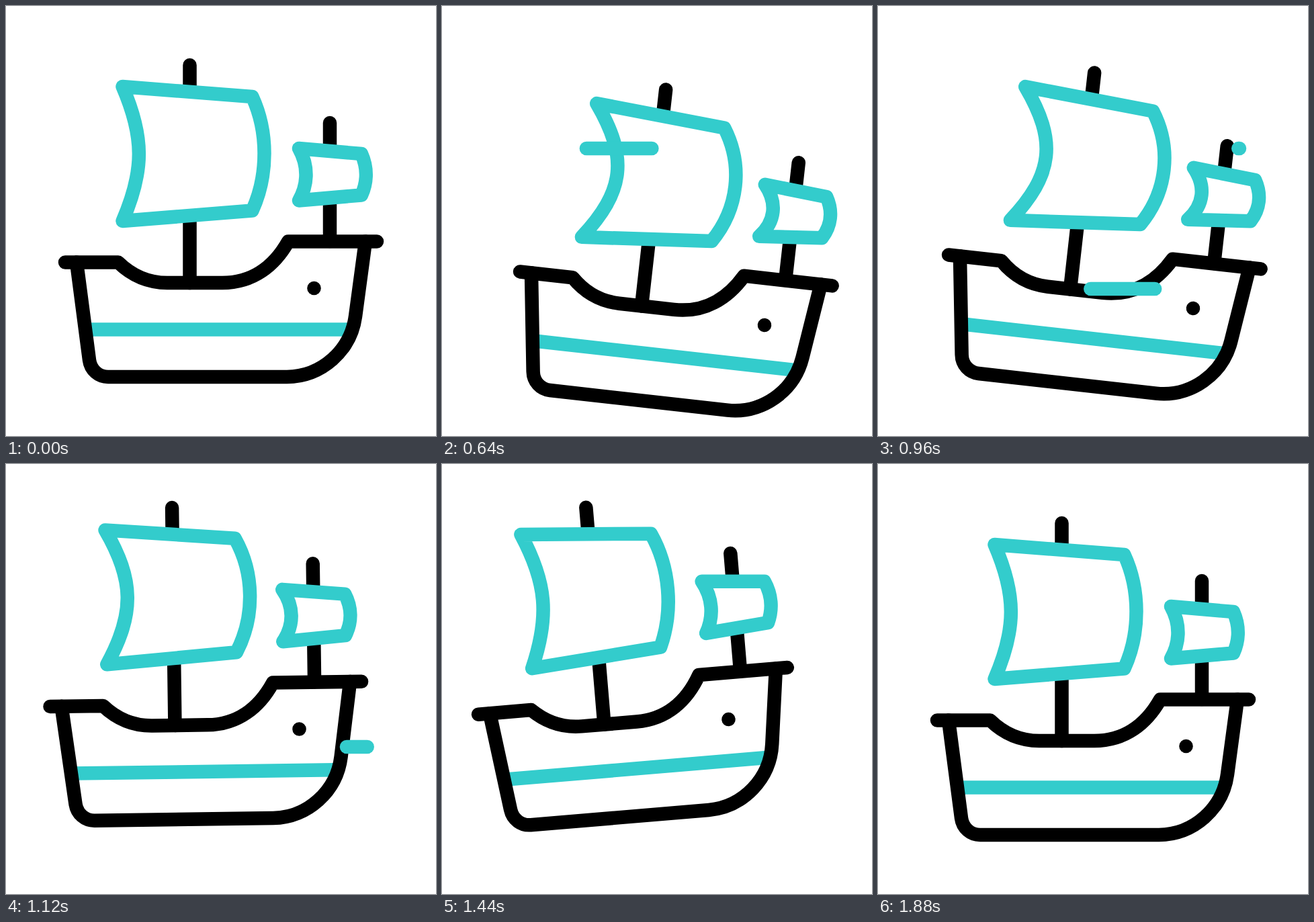
Write an HTML page that moves like this. It is 640 px wide and 640 px high and loops after 2160 ms.

```html
<!DOCTYPE html>
<html lang="en">
<head>
<meta charset="utf-8">
<title>Sailing ship</title>
<style>
  html, body { margin: 0; height: 100%; overflow: hidden; background: #fff; }
  svg { display: block; width: 100vw; height: 100vh; }
  path { fill: none; stroke: #000; stroke-width: 20.5; stroke-linecap: round; stroke-linejoin: round; }
  .teal { stroke: #3cc; }
  .sail { fill: #fff; }
</style>
</head>
<body>
<svg viewBox="0 0 640 640">
  <g id="ship">
    <path d="M273.5 88V412M482 174V350"/>
    <path id="mainSail" class="teal sail"/>
    <path id="smallSail" class="teal sail"/>
    <path class="teal" d="M121 481.5H510"/>
    <path d="M105 381.5L124 527C126 542 138 552 152 552H418A104 104 0 0 0 520 462L535 350.5"/>
    <path d="M88 381.5H167C187 401 212 412 240 412H322C368 412 400 386 420 350.5H552"/>
    <circle cx="458.5" cy="420" r="10.3"/>
  </g>
  <path id="wind1" class="teal"/>
  <path id="wind2" class="teal"/>
</svg>
<script>
const LOOP = 2160, STEP = 40;
const $ = id => document.getElementById(id);

// time, shift x, shift y, tilt in degrees, sail bulge
const poses = [
  [260, 0, 0, 0, 0],
  [440, 4.7, 9.4, 0.67, 2.6],
  [640, 33.5, 40.2, 6.4, 17.6],
  [800, 46, 44.6, 7.4, 20],
  [960, 22.5, 15.2, 6.4, 17.8],
  [1120, -23.3, -23.6, -0.77, 7.5],
  [1240, -39.5, -32.5, -4.3, 1.2],
  [1340, -44, -32.8, -5, 0],
  [1440, -39.9, -28, -4.8, 0],
  [1600, -21.5, -12.7, -2.85, 0],
  [1740, -4.8, -2, -0.4, 0],
  [1880, 0, 0, 0, 0]
];

function slope(i, c) {
  const a = poses[i - 1], b = poses[i], d = poses[i + 1];
  if (!a || !d) return 0;
  const h0 = b[0] - a[0], h1 = d[0] - b[0];
  return (h1 * (b[c] - a[c]) / h0 + h0 * (d[c] - b[c]) / h1) / (h0 + h1);
}

// Cubic Hermite curve through the poses
function sample(t, c) {
  const i = poses.findIndex(p => p[0] > t) - 1;
  if (i < 0) return 0;
  const a = poses[i], b = poses[i + 1], h = b[0] - a[0], u = (t - a[0]) / h, v = 1 - u;
  return v * v * (1 + 2 * u) * a[c] + u * u * (3 - 2 * u) * b[c]
    + h * u * v * (v * slope(i, c) - u * slope(i + 1, c));
}

function ease(t, start, duration) {
  const u = Math.min(1, Math.max(0, (t - start) / duration));
  return u * u * (3 - 2 * u);
}

function wind(id, y, t, headStart, tailStart, duration) {
  const head = ease(t, headStart, duration), tail = ease(t, tailStart, duration);
  const x = u => 79 + 459 * u;
  $(id).setAttribute('d', head > 0 && tail < 1 ? `M${x(tail)} ${y}H${x(head)}` : '');
}

function draw(t) {
  const [x, y, tilt, bulge] = [1, 2, 3, 4].map(c => sample(t, c));
  $('ship').setAttribute('transform', `translate(${x} ${y}) rotate(${tilt} 320 320)`);

  const left = 206 + bulge * 4 / 3, right = 390.5 + bulge * 0.58;
  $('mainSail').setAttribute('d',
    `M173.5 120L366.5 135C${right} 187 ${right} 252 366.5 304.5L173.5 320C${left} 245 ${left} 195 173.5 120Z`);
  const left2 = 450 + bulge * 0.42, right2 = 538 + bulge * 0.16;
  $('smallSail').setAttribute('d',
    `M436 212L529 220C${right2} 240 ${right2} 262 529 281.5L436 289.5C${left2} 265 ${left2} 237 436 212Z`);

  wind('wind1', 212, t, 372, 449, 530);
  wind('wind2', 421, t, 642, 712, 485);
}

const begin = performance.now();
function tick() {
  const t = (performance.now() - begin) % LOOP;
  draw(Math.floor(t / STEP) * STEP);
  requestAnimationFrame(tick);
}
tick();
</script>
</body>
</html>
```
